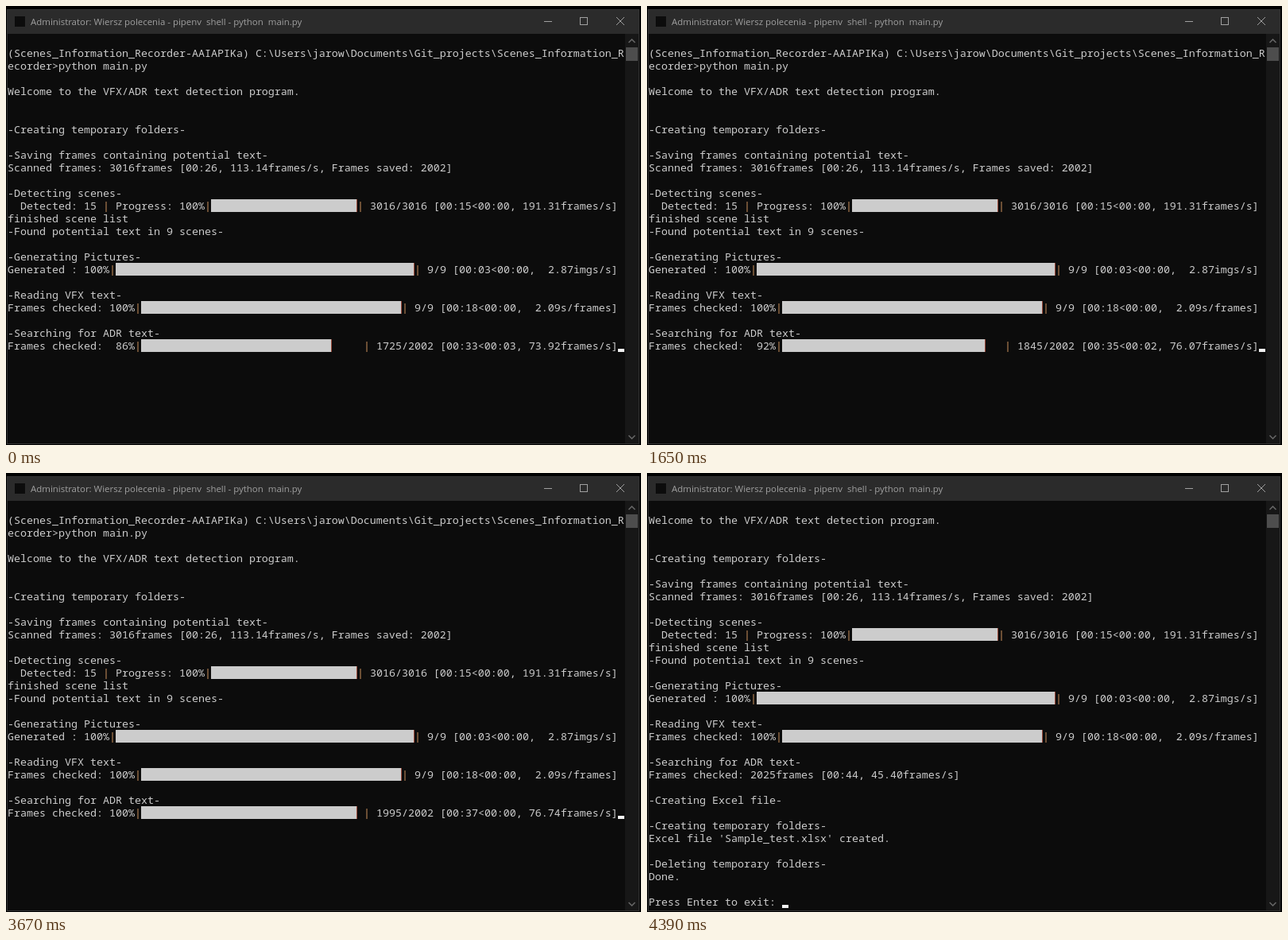
An HTML page that plays this animation: 799x552 px, repeating every 7270 ms.

```html
<!DOCTYPE html>
<html lang="en">
<head>
<meta charset="utf-8">
<title>Console</title>
<style>
  html, body { margin: 0; width: 100%; height: 100%; overflow: hidden; background: #000; }
  #stage { position: relative; width: 799px; height: 552px; overflow: hidden; }
  #frame { position: absolute; left: 0; top: 0; }
  #title {
    position: absolute; left: 31px; top: 10px; line-height: 20px; white-space: pre;
    font-family: "Open Sans", sans-serif; font-size: 11.45px; color: #a0a0a0;
  }
  #screen {
    position: absolute; left: 2px; top: 35px; margin: 0; color: #ccc;
    font-family: "Noto Sans Mono", monospace; font-size: calc(40px / 3); line-height: 16px;
  }
  #screen div { height: 16px; white-space: pre; }
  #screen i { color: #cf9460; font-style: normal; }
  #screen b {
    display: inline-block; height: 16px; vertical-align: top;
    background: #ccc; box-shadow: inset -1px 0 #9a4a3a;
  }
  #cursor { position: absolute; width: 8px; height: 4px; background: #f2f2f2; }
</style>
</head>
<body>
<div id="stage">
  <svg id="frame" width="799" height="552" shape-rendering="crispEdges">
    <rect x="1" y="4" width="796" height="547" fill="#333"/>
    <rect x="2" y="5" width="794" height="30" fill="#2b2b2b"/>
    <rect x="2" y="35" width="794" height="515" fill="#0c0c0c"/>
    <rect x="779" y="35" width="17" height="515" fill="#171717"/>
    <rect x="780" y="52" width="15" height="17" fill="#4d4d4d"/>
    <rect x="11" y="13" width="13" height="13" fill="#0c0c0c"/>
    <g fill="none" stroke="#a0a0a0">
      <path d="M677 19.5h10M722.5 14.5h9v9h-9z"/>
      <path d="M768 14l10 10M778 14l-10 10" shape-rendering="auto"/>
    </g>
    <path d="M783.5 46l4-4 4 4M783.5 540l4 4 4-4" fill="none" stroke="#686868" stroke-width="1.5" shape-rendering="auto"/>
  </svg>
  <div id="title">Administrator: Wiersz polecenia - pipenv  shell - python  main.py</div>
  <div id="screen"></div>
  <div id="cursor"></div>
</div>
<script>
const LOOP = 7270, ROWS = 32, TOTAL = 2002, BAR = 35;
const screenEl = document.getElementById("screen");
const cursorEl = document.getElementById("cursor");

const block = n => "█".repeat(n);
const pad = n => String(Math.floor(n)).padStart(2, "0");

const intro = [
  "",
  "(Scenes_Information_Recorder-AAIAPIKa) C:\\Users\\jarow\\Documents\\Git_projects\\Scenes_Information_R",
  "ecorder>python main.py",
  "",
  "Welcome to the VFX/ADR text detection program.",
  "", "",
  "-Creating temporary folders-",
  "",
  "-Saving frames containing potential text-",
  "Scanned frames: 3016frames [00:26, 113.14frames/s, Frames saved: 2002]",
  "",
  "-Detecting scenes-",
  `  Detected: 15 | Progress: 100%|${block(23)}| 3016/3016 [00:15<00:00, 191.31frames/s]`,
  "finished scene list",
  "-Found potential text in 9 scenes-",
  "",
  "-Generating Pictures-",
  `Generated : 100%|${block(47)}| 9/9 [00:03<00:00,  2.87imgs/s]`,
  "",
  "-Reading VFX text-",
  `Frames checked: 100%|${block(41)}| 9/9 [00:18<00:00,  2.09s/frames]`,
  "",
  "-Searching for ADR text-"
];

const outro = [
  "Frames checked: 2025frames [00:44, 45.40frames/s]",
  "",
  "-Creating Excel file-",
  "",
  "-Creating temporary folders-",
  "Excel file 'Sample_test.xlsx' created.",
  "",
  "-Deleting temporary folders-",
  "Done.",
  "",
  "Press Enter to exit: "
];

// Each update checks 15 more frames: [time, frames per second]
const updates = [
  [0, 73.92], [200, 74.36], [280, 74.98], [480, 75.45], [800, 74.81],
  [940, 75.26], [1130, 75.58], [1370, 75.87], [1650, 76.07], [1850, 76.12],
  [1930, 76.64], [2130, 76.83], [2330, 76.58], [2650, 76.31], [2940, 76.24],
  [3080, 76.57], [3390, 76.03], [3590, 76.18], [3670, 76.74]
];

// Closing output: [time, outro lines printed]
const prints = [[3990, 3], [4070, 5], [4110, 6], [4150, 8], [4390, 11]];

function progress(t, rate, i) {
  const n = 1725 + 15 * i;
  const pct = String(Math.round(n / TOTAL * 100)).padStart(3);
  const bar = block(Math.floor(n / TOTAL * BAR)).padEnd(BAR);
  const spent = pad(33.6 + t / 1000), left = pad((TOTAL - n) / rate);
  return `Frames checked: ${pct}%|${bar}| ${n}/${TOTAL} [00:${spent}<00:${left}, ${rate.toFixed(2)}frames/s]`;
}

const steps = [
  ...updates.map(([t, rate], i) => ({ t, lines: [...intro, progress(t, rate, i)] })),
  ...prints.map(([t, n]) => {
    const lines = [...intro, ...outro.slice(0, n)];
    if (n < outro.length) lines.push("");
    return { t, lines };
  })
];

const markup = line => "<div>" + line
  .replace(/</g, "&lt;")
  .replace(/\|/g, "<i>|</i>")
  .replace(/█+/g, s => `<b style="width:${s.length * 8}px"></b>`) + "</div>";

function draw({ lines }) {
  const rows = lines.slice(-ROWS);
  screenEl.innerHTML = rows.map(markup).join("");
  cursorEl.style.left = 2 + rows[rows.length - 1].length * 8 + "px";
  cursorEl.style.top = 35 + rows.length * 16 - 4 + "px";
}

let shown = null;
const start = performance.now();
function tick() {
  const t = (performance.now() - start) % LOOP;
  const step = steps.findLast(s => s.t <= t);
  if (step !== shown) draw(shown = step);
  requestAnimationFrame(tick);
}
tick();
</script>
</body>
</html>
```
